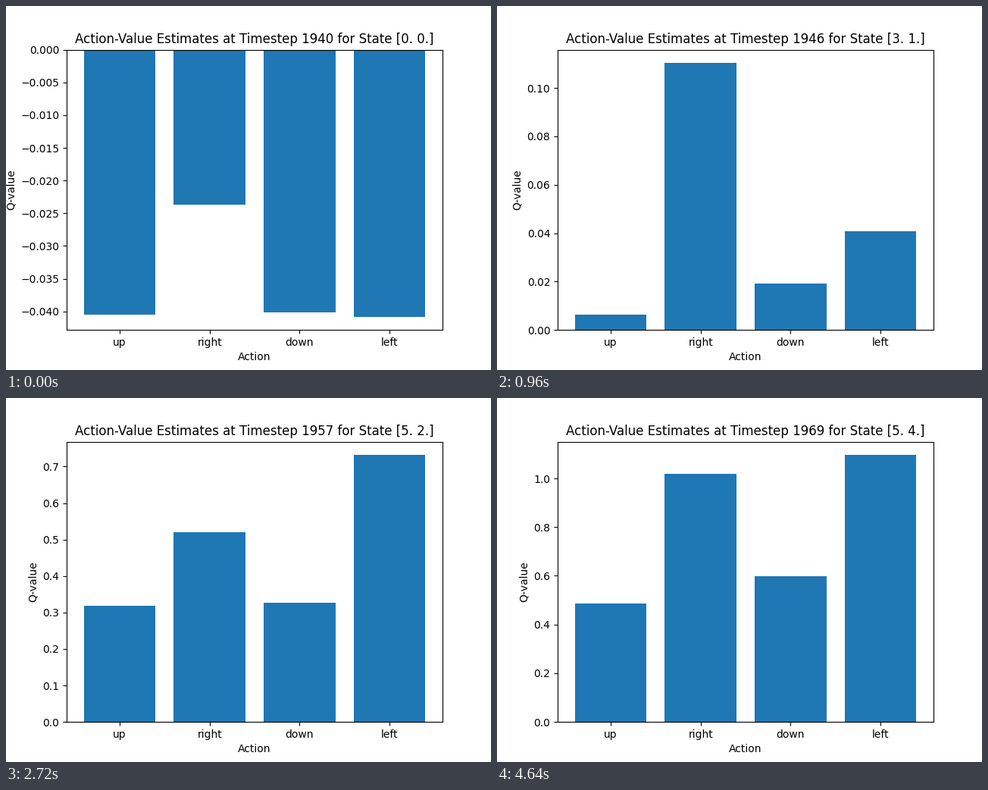
Animation, 640 px wide and 480 px high, one loop 4800 ms. Source, as a matplotlib script:

```python
import numpy as np
import matplotlib.pyplot as plt
from matplotlib.animation import FuncAnimation

ACTIONS = ["up", "right", "down", "left"]
START = 1940
FRAMES, INTERVAL = 30, 160

# Agent's walk, one character per timestep ("." = stays in place)
WALK = "...RRRU.LD.URR.U.R..U.UUL.RD.."
MOVES = {".": (0, 0), "R": (1, 0), "L": (-1, 0), "U": (0, 1), "D": (0, -1)}
STATES = np.cumsum([MOVES[m] for m in WALK], axis=0).astype(float)

# Estimates drift slowly while the agent stays and jump when it moves
PROGRESS = np.cumsum([0.2 if m == "." else 1.0 for m in WALK])

# Key points: step -> Q-values for up, right, down, left
KEYS = {
    0: (-.04049, -.02369, -.04015, -.0408),
    2: (-.0390, -.02299, -.04272, -.03864),
    6: (.0063, .1103, .0192, .0408),
    9: (-.024, .050, -.004, .008),
    12: (-.0105, .1579, .0339, .0464),
    17: (.3185, .520, .3268, .7318),
    21: (.395, .630, .430, .782),
    24: (.325, 1.032, .340, 1.0677),
    29: (.4863, 1.0187, .598, 1.096),
}


def q_values(step):
    at = PROGRESS[list(KEYS)]
    return [np.interp(PROGRESS[step], at, q) for q in zip(*KEYS.values())]


fig, ax = plt.subplots(figsize=(6.4, 4.8), dpi=100)


def draw(step):
    ax.clear()
    ax.bar(ACTIONS, q_values(step))
    ax.set_xlabel("Action")
    ax.set_ylabel("Q-value")
    ax.set_title(f"Action-Value Estimates at Timestep {START + step} "
                 f"for State {STATES[step]}")
    return ax.patches


anim = FuncAnimation(fig, draw, frames=FRAMES, interval=INTERVAL,
                     init_func=lambda: draw(0), repeat=True, repeat_delay=0)
plt.show()
```
